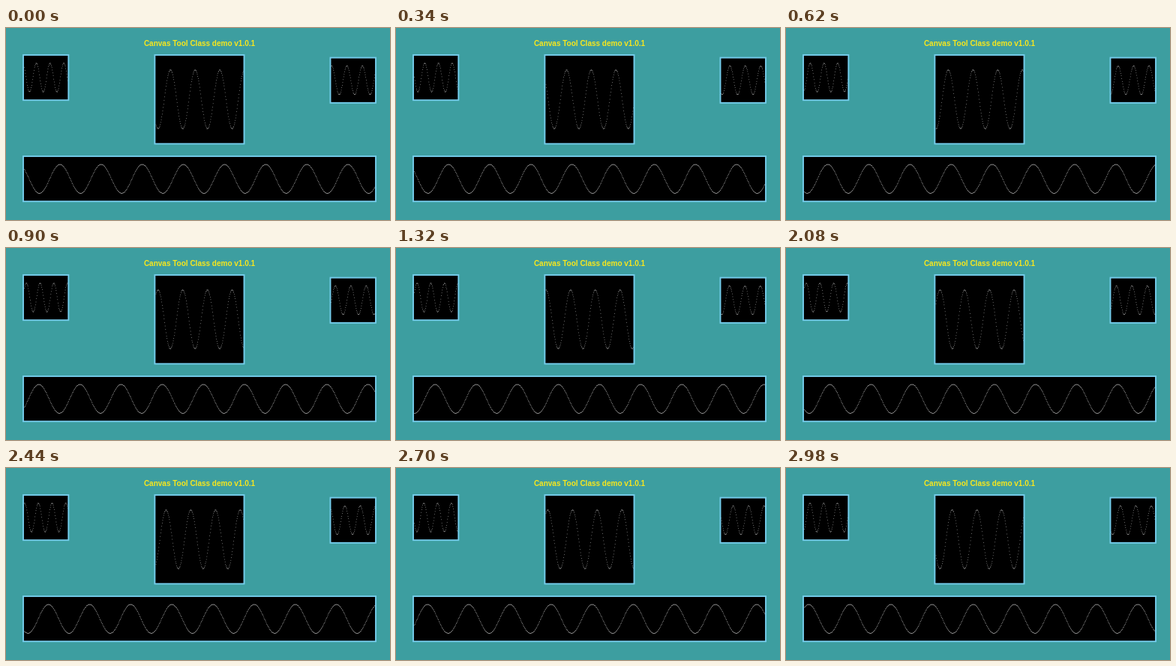
These frames come from a looping animation (512 px wide and 256 px high, 3000 ms). An HTML page with a canvas:

```html
<!DOCTYPE html>
<html lang="en">
<head>
<meta charset="utf-8">
<title>Canvas Tool Class demo</title>
<style>
  html, body { margin: 0; width: 100%; height: 100%; overflow: hidden; background: #3d9ea0; }
  canvas { display: block; }
</style>
</head>
<body>
<canvas id="stage" width="512" height="256"></canvas>
<script>
const ctx = document.getElementById('stage').getContext('2d');
const LOOP = 3000, FRAME = 20;
const DOT = 0.64; // dot size and spacing

// peak: x of a crest at tick 0; speed: px per tick
const scopes = [
  { x: 23, y: 36, w: 60.3, h: 60.2, mid: 66, amp: 19.2, length: 18.286, peak: 40.5, speed: 0.7695 },
  { x: 198.4, y: 36, w: 119.1, h: 118.4, mid: 95.1, amp: 39.2, length: 32.914, peak: 219.3, speed: -2.745 },
  { x: 432.5, y: 39.6, w: 60.5, h: 60.2, mid: 69.7, amp: 19.2, length: 20.571, peak: 434.05, speed: -1.428 },
  { x: 23, y: 171, w: 470, h: 60.2, mid: 201.2, amp: 19.2, length: 54.857, peak: 72, speed: 2.525 }
];

const snap = v => Math.round(v / DOT) * DOT;

function drawScope(s, tick) {
  ctx.fillStyle = '#000';
  ctx.fillRect(s.x, s.y, s.w, s.h);
  ctx.fillStyle = '#fff';
  const crest = s.peak + s.speed * tick;
  for (let x = snap(s.x + 1); x < s.x + s.w - 1; x += DOT) {
    const y = s.mid - s.amp * Math.cos((x + DOT / 2 - crest) / s.length * 2 * Math.PI);
    ctx.fillRect(x, snap(y - DOT / 2), DOT, DOT);
  }
  ctx.strokeStyle = '#74cdec';
  ctx.lineWidth = 1.9;
  ctx.strokeRect(s.x, s.y, s.w, s.h);
}

function draw(ms) {
  // the waves step at just under 60 Hz, shown at 50 Hz
  const tick = Math.floor(Math.floor(ms / FRAME) * 1.199 + 0.62);
  ctx.fillStyle = '#3d9ea0';
  ctx.fillRect(0, 0, 512, 256);
  ctx.fillStyle = '#f8e71c';
  ctx.font = 'bold 10px "Liberation Sans", Arial, sans-serif';
  ctx.textAlign = 'center';
  ctx.fillText('Canvas Tool Class demo v1.0.1', 258, 24);
  for (const s of scopes) drawScope(s, tick);
}

const start = performance.now();
function loop() {
  draw((performance.now() - start) % LOOP);
  requestAnimationFrame(loop);
}
loop();
</script>
</body>
</html>
```
